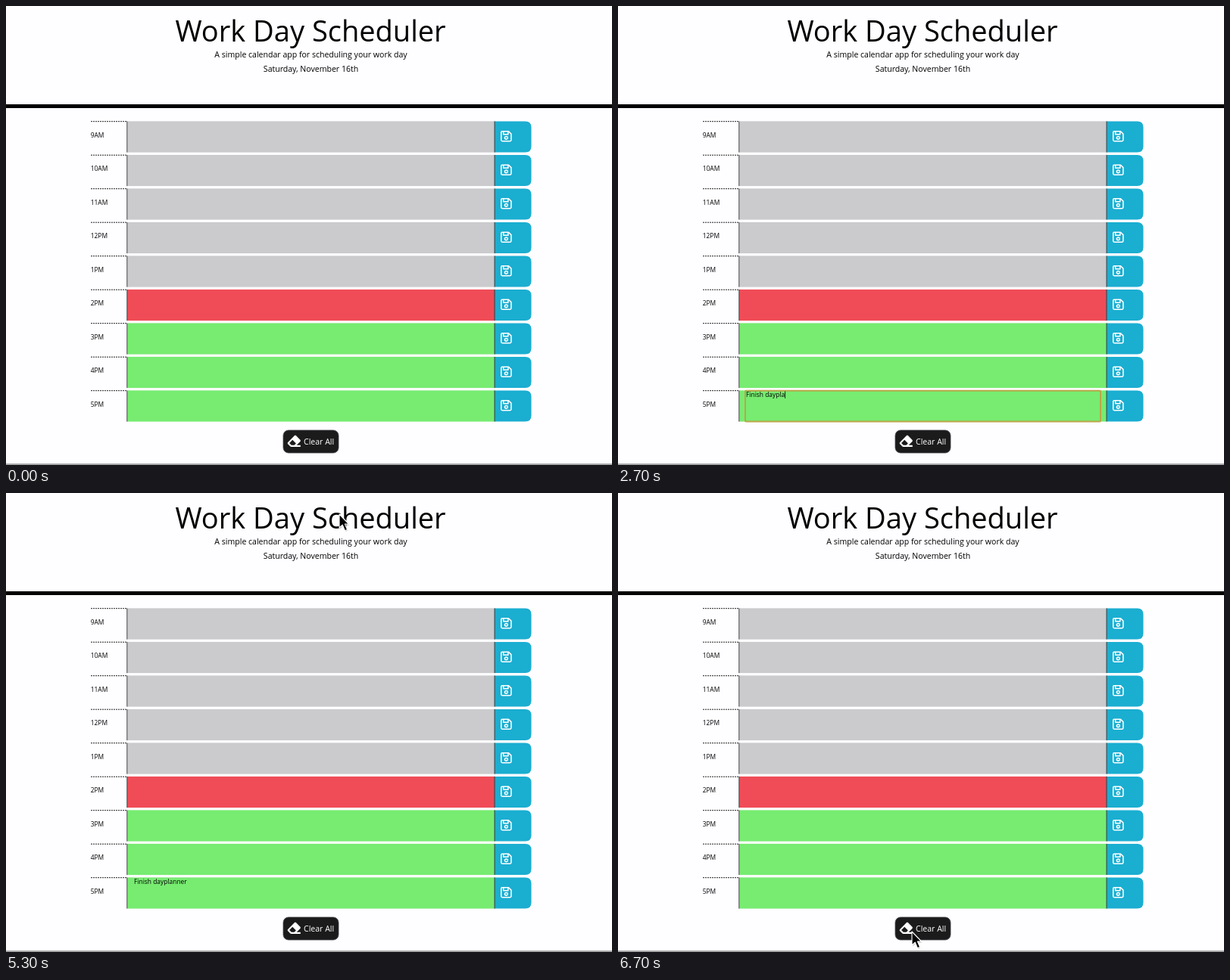
Write an HTML page that moves like this. It is 800 px wide and 607 px high and loops after 7600 ms.

```html
<!DOCTYPE html>
<html lang="en">
<head>
<meta charset="utf-8">
<title>Work Day Scheduler</title>
<style>
  html, body { margin: 0; width: 100%; height: 100%; overflow: hidden; background: #fefdff; }
  svg { display: block; width: 100vw; height: 100vh; }
  text { font-family: "Open Sans", sans-serif; font-size: 10.56px; white-space: pre; }
  .mid { text-anchor: middle; }
  .small { font-size: 8.44px; }
  .plain text { font-family: "Liberation Sans", Arial, sans-serif; }
</style>
</head>
<body>
<svg viewBox="0 0 800 607">
  <defs>
    <g id="disk" fill="none" stroke="#fff" stroke-width="1.5" stroke-linejoin="round">
      <path d="M-5.4 -6.4H3.2L6.6 -3V5.2Q6.6 6.6 5.2 6.6H-5.2Q-6.6 6.6 -6.6 5.2V-5Q-6.6 -6.4 -5.4 -6.4Z"/>
      <path d="M-3.6 -6V-2.4H2.6V-6"/>
      <circle cy="2.2" r="1.9"/>
    </g>
    <path id="eraser" fill="#fff" fill-rule="evenodd" d="M498 274c19-19 19-49 0-68l-160-160c-19-19-49-19-68 0l-256 256c-19 19-19 49 0 68l96 96q14 14 34 14h356q12 0 12-12v-40q0-12-12-12H356zM195 211L333 349L265 416H151L71 336z"/>
  </defs>
  <rect width="800" height="607" fill="#fefdff"/>

  <g id="app">
    <text class="mid" x="402" y="47" style="font-size:38px">Work Day Scheduler</text>
    <text class="mid" x="402.5" y="67.5">A simple calendar app for scheduling your work day</text>
    <text class="mid" x="402.5" y="86.5">Saturday, November 16th</text>
    <rect y="130" width="800" height="5"/>
    <g id="rows"></g>
    <rect id="focus" x="168" y="508.7" width="469" height="40.8" rx="1" fill="none" stroke="#bba649" stroke-width="2"/>
    <text id="note" class="small" x="169" y="516.5"></text>
    <path id="caret" stroke="#000" stroke-width=".8"/>
    <path id="typo" d="M194 518.6H238.5" stroke="#e2463c" stroke-width="1.2" stroke-dasharray="1.3 .8"/>
    <rect x="366" y="561" width="73" height="30" rx="7" fill="#1b1b1c" stroke="#46424a" stroke-width=".8"/>
    <use href="#eraser" transform="translate(371.7 566.8) scale(.0335)"/>
    <text x="393" y="580" fill="#fff">Clear All</text>
  </g>

  <g id="bare" class="plain">
    <text class="mid" x="402" y="45" style="font-size:37.8px" stroke="#fefdff" stroke-width=".8">Work Day Scheduler</text>
    <text class="mid" x="402.5" y="67" style="font-size:10.7px">A simple calendar app for scheduling your work day</text>
    <rect y="111" width="800" height="5"/>
    <rect x="366" y="141.5" width="73" height="30" rx="7" fill="#1b1b1c" stroke="#46424a" stroke-width=".8"/>
    <text x="390" y="160" fill="#fff" font-weight="700">Clear All</text>
  </g>

  <path d="M0 606H800" stroke="#505050"/>
  <circle id="dot" cx="469.5" cy="115" r="12.8" fill="#919091"/>
  <circle id="ring" fill="none" stroke="#111" stroke-width="2"/>
  <g id="arrow">
    <path d="M1 2V19.5L5 16L8.2 23L11.2 21.8L8.2 15H13.2Z" fill="#000" opacity=".18"/>
    <path d="M0 0V18L4.2 14.2L7.4 21.8L10.6 20.5L7.4 13H12.6Z" stroke="#fff" stroke-width="1.1" stroke-linejoin="round"/>
  </g>
</svg>
<script>
const LOOP = 7600, STEP = 100;
const $ = id => document.getElementById(id);
const show = (id, on) => $(id).setAttribute('display', on ? 'inline' : 'none');
const set = (id, attrs) => { for (const k in attrs) $(id).setAttribute(k, attrs[k]); };

const hours = ['9AM', '10AM', '11AM', '12PM', '1PM', '2PM', '3PM', '4PM', '5PM'];
const fillOf = i => i < 5 ? '#cbcacc' : i === 5 ? '#f04c57' : '#77ec71';
$('rows').innerHTML = hours.map((hour, i) => `
  <g transform="translate(0 ${152.4 + i * 44.5})">
    <path d="M112 .3H160" stroke="#222" stroke-dasharray="2 1"/>
    <text class="small" x="111.7" y="21.3">${hour}</text>
    <rect x="160" width="485" height="41.2" fill="${fillOf(i)}"/>
    <path d="M645 0H685.5Q693.5 0 693.5 8V33.2Q693.5 41.2 685.5 41.2H645Z" fill="#1aaed1"/>
    <path d="M159.8 0V41.2M645 0V41.2" stroke="#333" stroke-width=".9"/>
    <use href="#disk" x="660.3" y="19.7"/>
  </g>`).join('');

// Moment at which each letter of the note is typed
const words = 'Finish dayplanner';
const keys = [1000, 1100, 1200, 1300, 1400, 1500, 1600, 1800, 2000, 2200, 2400, 2500, 2700, 2800, 2900, 3000, 3200];

// Pointer journeys: start, end, from, to
const moves = [
  { a: 100, b: 500, until: 900, from: [470, 45], to: [402, 535] },
  { a: 3200, b: 3400, until: 3800, from: [402, 535], to: [681, 517] },
  { a: 3700, b: 3900, until: 3900, from: [681, 517], to: [469, 115] },
  { a: 5300, b: 6000, until: 6100, from: [440, 28], to: [384, 581] },
  { a: 6100, b: 6100, until: LOOP, from: [388, 580], to: [388, 580] }
];
// Click rings: time, length, centre
const clicks = [[600, 200, 402, 535], [3400, 200, 682, 517.5], [6500, 100, 388, 581]];

const ease = p => p * p * (3 - 2 * p);
const within = (t, a, b) => t >= a && t < b;

function drawPointer(t) {
  const move = moves.filter(m => within(t, m.a + (m.a === 3700 ? 100 : 0), m.until)).pop();
  show('arrow', move);
  if (move) {
    const p = ease(Math.min(1, (t - move.a) / (move.b - move.a || 1)));
    const [x, y] = move.from.map((v, i) => v + (move.to[i] - v) * p);
    set('arrow', { transform: `translate(${x} ${y})` });
  }
  const click = clicks.find(([start, len]) => within(t, start, start + len));
  show('ring', click);
  if (click) {
    const age = (t - click[0]) / 100;
    set('ring', { cx: click[2], cy: click[3], r: 29 + 6 * age, opacity: 1 - .5 * age });
  }
  show('dot', within(t, 3900, 4000));
}

function draw(time) {
  const t = Math.floor(time % LOOP / STEP) * STEP;
  const blank = within(t, 6600, 6700);
  show('app', !blank);
  show('bare', blank);

  const focused = within(t, 700, 3400);
  const note = $('note');
  note.textContent = t < 6600 ? words.slice(0, keys.filter(k => k <= t).length) : '';
  show('focus', focused);
  show('caret', focused);
  show('typo', within(t, 3400, 4200));
  if (focused) {
    const x = 169.4 + (note.textContent ? note.getComputedTextLength() : 0);
    set('caret', { d: `M${x} 509.5V519` });
  }
  drawPointer(t);
}

const start = performance.now();
function tick() {
  draw(performance.now() - start);
  requestAnimationFrame(tick);
}
tick();
</script>
</body>
</html>
```
